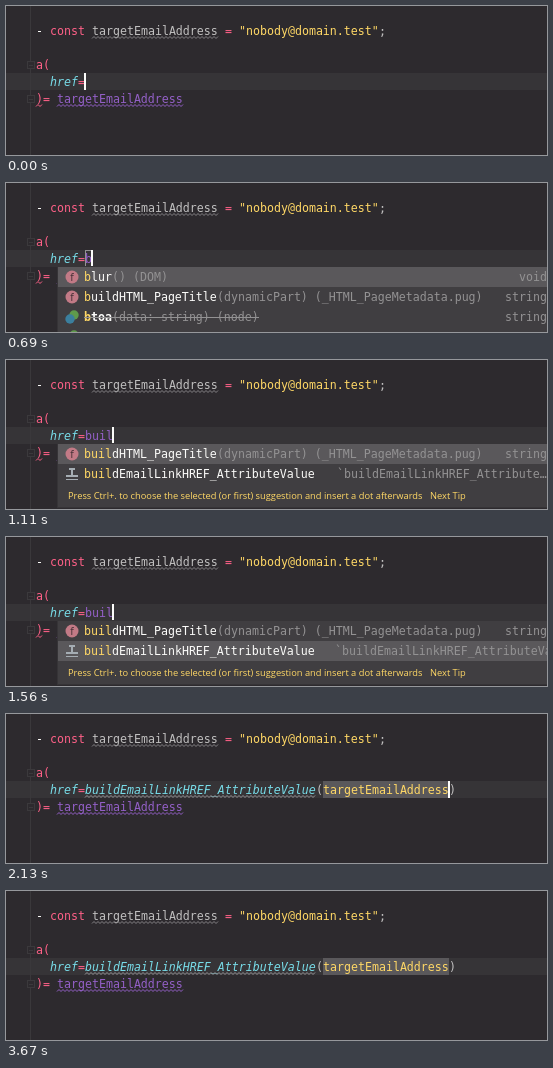
Animation, 541 px wide and 149 px high, one loop 3.74 s. Source, as an HTML page with a canvas:

```html
<!DOCTYPE html>
<html lang="en">
<head>
<meta charset="utf-8">
<title>Code completion</title>
<style>
html, body { margin: 0; width: 100%; height: 100%; overflow: hidden; background: #2d2a2e; }
canvas { display: block; }
</style>
</head>
<body>
<canvas id="stage" width="541" height="149"></canvas>
<script>
const ctx = document.getElementById('stage').getContext('2d');
const LOOP = 3740, CHAR = 7, LEFT = 30, RIGHT = 541;
const MONO = '11.627px "DejaVu Sans Mono", monospace';
const C = {
  back: '#2d2a2e', line: '#363437', popup: '#403e41', selected: '#5a585b',
  pink: '#ff6188', cyan: '#78dce8', purple: '#9460c8', yellow: '#ffd866',
  plain: '#c1c0c0', grey: '#939293', white: '#fcfcfa', fold: '#3b393c'
};
const VARIABLE = 'targetEmailAddress';
const CALL = 'buildEmailLinkHREF_AttributeValue';
const KEY_TIMES = [560, 760, 910, 1110];

function rect(x, y, w, h, color) {
  ctx.fillStyle = color;
  ctx.fillRect(x, y, w, h);
}

function outline(x, y, w, h, color) {
  ctx.strokeStyle = color;
  ctx.lineWidth = 1;
  ctx.strokeRect(x + 0.5, y + 0.5, w - 1, h - 1);
}

function disc(x, y, r, color) {
  ctx.fillStyle = color;
  ctx.beginPath();
  ctx.arc(x, y, r, 0, 2 * Math.PI);
  ctx.fill();
}

// Draws text and returns the x where the next piece begins.
function text(str, x, y, color, style = '') {
  ctx.font = `${style} ${MONO}`;
  ctx.fillStyle = color;
  ctx.fillText(str, x, y);
  return x + str.length * CHAR;
}

function pieces(x, y, ...list) {
  for (const [str, color, style] of list) x = text(str, x, y, color, style);
  return x;
}

function wave(x, baseline, chars, color) {
  const end = x + chars * CHAR;
  ctx.strokeStyle = color;
  ctx.lineWidth = 1;
  ctx.beginPath();
  for (let i = 0; x + i * 2 <= end; i++) ctx.lineTo(x + i * 2, baseline + (i % 2 ? 1.5 : 3.5));
  ctx.stroke();
}

function foldMark(y) {
  rect(21, y - 4, 8, 8, C.back);
  outline(21, y - 4, 8, 8, C.fold);
  rect(23, y, 4, 1, C.fold);
}

function caret(x) {
  rect(x - 1, 67, 2, 17, C.white);
}

function functionIcon(y) {
  disc(66, y, 6.5, '#c27a86');
  ctx.font = '10px "DejaVu Sans", sans-serif';
  ctx.fillStyle = '#4a3238';
  ctx.fillText('f', 64.3, y + 3.7);
}

function libraryIcon(y) {
  disc(68, y - 2, 4.7, '#5f9a4c');
  disc(64, y + 2, 4.7, '#3b7f9e');
}

function stampIcon(y) {
  rect(63, y - 6, 6, 2, '#a5adb3');
  rect(65, y - 4, 2, 5, '#a5adb3');
  rect(60, y + 1, 12, 2, '#a5adb3');
  rect(60, y + 5, 12, 1, '#a5adb3');
}

function row(index, icon, name, detail, type, matched, style) {
  const y = 84 + index * 20;
  icon(y + 10);
  text(type, RIGHT - type.length * CHAR, y + 14, C.grey);
  return pieces(78, y + 14,
    [name.slice(0, matched), C.yellow, style],
    [name.slice(matched), C.white, style],
    [detail, C.grey]);
}

function popup(typed, selected) {
  const full = typed === 1;
  rect(51, 83, 490, full ? 66 : 65, C.line);
  rect(52, 84, 489, full ? 65 : 63, C.popup);
  rect(52, 84 + selected * 20, 489, 20, C.selected);
  const build = i => row(i, functionIcon, 'buildHTML_PageTitle',
    '(dynamicPart) (_HTML_PageMetadata.pug)', 'string', typed);
  if (full) {
    row(0, functionIcon, 'blur', '() (DOM)', 'void', 1);
    build(1);
    const end = row(2, libraryIcon, 'btoa', '(data: string) (node)', 'string', 1, 'bold');
    rect(78, 134, end - 78, 1, C.grey);
    libraryIcon(154);
    return;
  }
  build(0);
  row(1, stampIcon, CALL, '', '', typed);
  if (selected) text('`' + CALL, 329, 118, C.grey);
  else text('`buildEmailLinkHREF_Attribute…', 331, 118, C.grey);
  ctx.font = '9.3px "Open Sans", sans-serif';
  ctx.fillStyle = C.yellow;
  ctx.fillText('Press Ctrl+. to choose the selected (or first) suggestion and insert a dot afterwards', 62, 139);
  ctx.fillText('Next Tip', 424, 139);
}

function draw(t) {
  const inserted = t >= 1870, analysed = t >= 2130;
  const typed = KEY_TIMES.filter(k => t >= k).length;

  rect(0, 0, 541, 149, C.back);
  rect(0, 67, 541, 17, C.line);
  rect(24, 0, 1, 149, '#3a383b');
  foldMark(59);
  foldMark(93);

  pieces(LEFT, 29, ['- ', C.white], ['const ', C.pink], [VARIABLE, C.plain], [' = ', C.pink],
    ['"nobody@domain.test"', C.yellow], [';', C.plain]);
  wave(86, 29, VARIABLE.length, '#858386');
  text('a(', LEFT, 63, C.pink);
  const start = pieces(44, 80, ['href', C.cyan, 'italic'], ['=', C.pink]);

  pieces(LEFT, 97, [')= ', C.pink], [VARIABLE, C.purple]);
  wave(51, 97, VARIABLE.length, C.purple);
  if (!analysed) wave(LEFT, 97, 1, C.pink);

  if (inserted) {
    rect(317, 67, VARIABLE.length * CHAR, 17, C.selected);
    const end = pieces(start, 80,
      analysed ? [CALL, C.cyan, 'italic'] : [CALL, C.purple],
      ['(', C.plain],
      [VARIABLE, analysed ? C.yellow : C.purple]);
    text(')', end, 80, C.plain);
    if (analysed) wave(start, 80, CALL.length, '#9a989b');
    if (t < 2840 || (t >= 3360 && t < 3670)) caret(end);
    return;
  }

  const end = text(CALL.slice(0, typed), start, 80, C.purple);
  const open = t >= 630 && t < 1800;
  if (open && typed === 1) outline(start, 67, CHAR, 17, C.grey);
  if (t < 310 || t >= 560) caret(end);
  if (open) popup(typed, t >= 1560 ? 1 : 0);
}

function tick() {
  draw(performance.now() % LOOP);
  requestAnimationFrame(tick);
}
tick();
</script>
</body>
</html>
```
